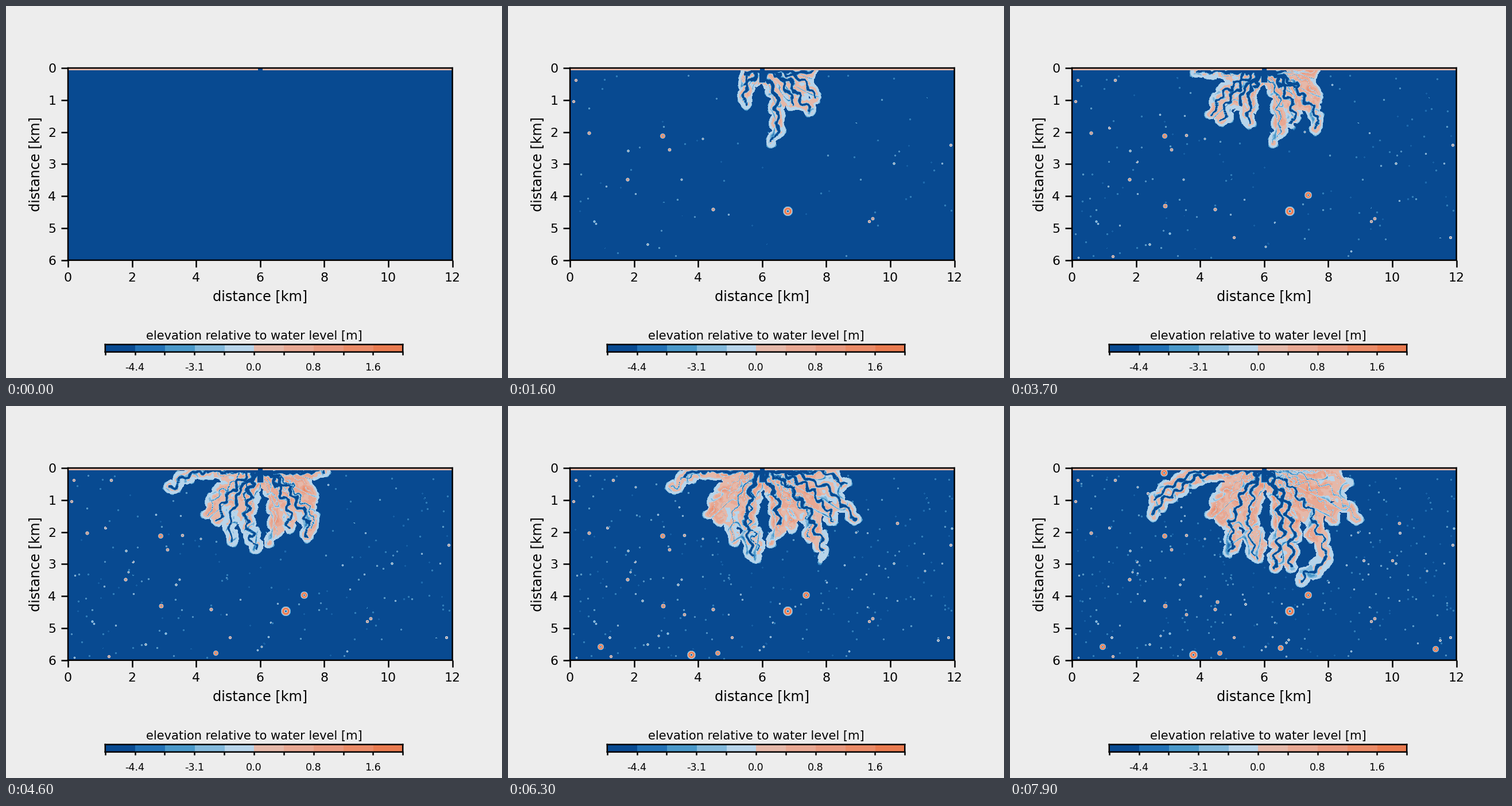
Recreate the animation shown at these times as a matplotlib script. Size 864 px wide and 648 px high, loop 8 s.

```python
import numpy as np
import matplotlib.pyplot as plt
from matplotlib.animation import FuncAnimation
from matplotlib.colors import ListedColormap

FRAMES, STEP = 80, 100
W, H = 670, 335                 # map size in pixels
X0, Y0 = 108, 108               # map corner on the stage
ROWS, COLS = slice(0, 214), slice(116, 522)   # part the delta can reach
MOUTH = np.array([443., 108.])
GROWTH = 1.2                    # seconds a lobe needs to build out

COLORS = ["#084a91", "#2271b5", "#4a98c9", "#83b9dc", "#b7d4ea",
          "#e5b8a9", "#e8a893", "#e8997f", "#ea8b67", "#e97b50"]
CMAP = ListedColormap(COLORS)

# lobe tip and the time it is reached
LOBES = [(408, 133, .8), (530, 116, 1), (412, 168, 1.1), (536, 156, 1.2),
         (497, 170, 1.4), (522, 186, 1.5), (461, 237, 1.6),
         (352, 190, 2.5), (325, 115, 2.7), (418, 203, 2.8), (537, 210, 2.7),
         (370, 200, 3.6), (494, 212, 3.8), (390, 232, 4.2), (285, 144, 4.3),
         (528, 226, 4.4), (555, 116, 4.5), (434, 248, 4.6),
         (588, 137, 5.2), (566, 200, 5.5), (604, 198, 5.6),
         (430, 264, 6.3), (549, 270, 6.4), (252, 163, 6.7), (457, 281, 6.8),
         (386, 257, 7.6), (247, 187, 7.8), (486, 281, 7.8)]

# the largest craters: x, y, radius, time
CRATERS = [(269, 226, 5, .4), (487, 357, 9, .9), (270, 348, 4.5, 2.2),
           (519, 329, 7, 3.4), (365, 430, 5, 4), (161, 419, 6, 5.2),
           (319, 433, 8, 6), (268, 116, 7, 6.5), (741, 423, 6, 7.3),
           (471, 421, 5.5, 7.6)]


def noise(u, v, seed):
    """Smooth value noise in -1..1."""
    grid = np.random.default_rng(seed).uniform(-1, 1, (64, 64))
    iu, iv = np.floor(u).astype(int), np.floor(v).astype(int)
    fu, fv = u - iu, v - iv
    fu, fv = fu * fu * (3 - 2 * fu), fv * fv * (3 - 2 * fv)

    def at(a, b):
        return grid[(iu + a) % 64, (iv + b) % 64]

    return ((at(0, 0) * (1 - fu) + at(1, 0) * fu) * (1 - fv)
            + (at(0, 1) * (1 - fu) + at(1, 1) * fu) * fv)


yy, xx = np.mgrid[0:H, 0:W]
yy, xx = yy + Y0 + .5, xx + X0 + .5
dx, dy = xx[ROWS, COLS], yy[ROWS, COLS]
radius = np.hypot(dx - MOUTH[0], dy - MOUTH[1])
angle = np.arctan2(dy - MOUTH[1], dx - MOUTH[0])

# slightly bent coordinates give ragged banks
wx = dx + 2.5 * noise(dx / 9, dy / 9, 1) + 1.3 * noise(dx / 4, dy / 4, 2)
wy = dy + 2.5 * noise(dx / 9, dy / 9, 3) + 1.3 * noise(dx / 4, dy / 4, 4)

rng = np.random.default_rng(12)
arrival = np.full(dx.shape, np.inf)   # time at which each pixel silts up
channels = []                         # distance, half width, opening, closing


def course(start, tip, bow):
    """Bowed path from start to tip with meanders, never above the shore."""
    chord = tip - start
    length = np.hypot(*chord)
    side = np.array([-chord[1], chord[0]]) / length
    s = np.linspace(0, 1, int(length / 2))
    wave = rng.uniform(3, 5) * np.sin(s * length / rng.uniform(3.3, 4.4) + rng.uniform(0, 6))
    wave += 2 * np.sin(s * length / 9 + rng.uniform(0, 6))
    wave *= np.clip(s * length / 25, 0, 1)
    pts = start + np.outer(s, chord) + np.outer(4 * bow * length * s * (1 - s) + wave, side)
    pts[1:, 1] = np.maximum(pts[1:, 1], 114 + wave[1:] / 2)
    return pts


def add_lobe(start, tip, t1, bow, span=GROWTH):
    pts = course(np.array(start, float), np.array(tip, float), bow)
    best, share = np.full(dx.shape, 1e9), np.zeros(dx.shape)
    for s, (px, py) in zip(np.linspace(0, 1, len(pts)), pts):
        d = (wx - px) ** 2 + (wy - py) ** 2
        hit = d < best
        best[hit], share[hit] = d[hit], s
    d = np.sqrt(best)
    reach = 16 - 5 * share
    when = t1 - span + span * (.85 * share + .15 * d / reach)
    inside = d < reach
    arrival[inside] = np.minimum(arrival, np.maximum(when, 0))[inside]
    channels.append((d, 2.7 - 1.1 * share, t1 - span + span * share, t1 + 1.1))


for x, y, t1 in LOBES:
    add_lobe(MOUTH, (x, y), t1, .13 * np.sign(MOUTH[0] - x))
add_lobe((549, 262), (504, 303), 6.9, -.1, .5)
trunk = np.maximum(np.abs(dx - MOUTH[0]), dy - 128)

# ---- craters: height and time of impact per pixel ----
pit, pit_time = np.zeros((H, W)), np.full((H, W), np.inf)


def crater(x, y, r, top, t):
    n = int(r) + 2
    cy, cx = int(y) - Y0, int(x) - X0
    box = (slice(max(cy - n, 0), cy + n + 1), slice(max(cx - n, 0), cx + n + 1))
    q = np.hypot(xx[box] - x - .5, yy[box] - y - .5) / r
    hit = q < 1.05
    pit[box][hit] = (top * np.exp(-((q - .46) / .27) ** 2))[hit]
    pit_time[box][hit] = t


for t in np.sort(rng.uniform(.02, 7.9, 390)):
    size = rng.random()
    crater(int(rng.uniform(110, 775)), int(rng.uniform(114, 441)),
           2.1 + 2.2 * size ** 8, 1.1 + 3.6 * size + 3.5 * size ** 10, t)
for x, y, r, t in CRATERS:
    crater(x, y, r * 1.15, min(9.9, 5 + .9 * r), t)

# ---- surface texture, drawn out along the flow ----
streak = (noise(radius / 24, angle * 8 + 30, 5)
          + .7 * noise(radius / 11, angle * 17 + 30, 6)
          + .5 * noise(dx / 5, dy / 5, 7))
rills = np.clip(1 - np.abs(noise(radius / 30, angle * 7 + 30, 8)) / .14, 0, 1)
blobs = np.clip(noise(dx / 10, dy / 10, 9) - .5, 0, 1)


def soften(mask):
    """Blur with the top edge mirrored, so only open banks fade."""
    m = np.vstack([mask[::-1], mask]).astype(np.float32)
    for k in (1, 2, 3, 4):
        for axis in (0, 1):
            m = (m + np.roll(m, k, axis) + np.roll(m, -k, axis)) / 3
    return m[len(mask):]


def delta(t):
    mask = arrival < t
    soft = soften(mask)
    age = np.clip((t - arrival) / 4, 0, 1)
    inner = np.clip((soft - .7) / .25, 0, 1)
    z = np.minimum(4.6, 3 + (soft - .45) * 12)
    z += inner * (.1 + .9 * streak + 1.1 * age + 5 * blobs * age - 3 * rills)
    cut = 1 + 2.6 * (trunk - 4.5)
    gap = trunk - 4.5
    for d, width, opened, off in channels:
        if t <= opened.min():
            continue
        fade = np.clip((t - off) / 1.5, 0, 1)
        bank = np.where(t > opened, d - width * (1 - .55 * fade), 99)
        cut = np.minimum(cut, 1 + 2.6 * bank + 4 * fade)
        gap = np.minimum(gap, bank)
    z += .8 * np.clip(1.2 - gap / 5, 0, 1) * (soft > .65)
    return mask, np.minimum(z, cut)


def surface(t):
    z = np.where(pit_time <= t, pit, 0)
    mask, land = delta(t)
    z[ROWS, COLS] = np.where(mask, land, z[ROWS, COLS])
    z[:4] = 5.5
    z[:4, 331:339] = 0
    return np.clip(z, 0, 9.99)


plt.rcParams.update({
    "font.family": "DejaVu Sans", "axes.linewidth": 1,
    "xtick.major.width": 1, "ytick.major.width": 1,
    "xtick.major.size": 4.8, "ytick.major.size": 4.8,
    "axes.labelsize": 9.6, "xtick.labelsize": 8.8, "ytick.labelsize": 8.8,
})
fig = plt.figure(figsize=(4.8, 3.6), dpi=180, facecolor="#ededed")
ax = fig.add_axes([.125, 205.2 / 648, .775, 334.8 / 648])
image = ax.imshow(surface(0), cmap=CMAP, vmin=0, vmax=10, aspect="auto",
                  extent=(0, 12, 6, 0), interpolation="nearest")
ax.set_xticks(range(0, 13, 2))
ax.set_yticks(range(7))
ax.set_xlabel("distance [km]", labelpad=4.3)
ax.set_ylabel("distance [km]")

bar = fig.add_axes([.2, .07, .6, .02])
bar.imshow([np.arange(10) + .5], cmap=CMAP, vmin=0, vmax=10, aspect="auto",
           extent=(0, 10, 0, 1), interpolation="nearest")
bar.set_yticks([])
bar.set_xticks(range(11), ["", "-4.4", "", "-3.1", "", "0.0", "", "0.8", "", "1.6", ""])
bar.tick_params(axis="x", length=2, pad=5.2, labelsize=7)
fig.text(.5, 1 - 580.5 / 648, "elevation relative to water level [m]",
         fontsize=8.4, ha="center", va="baseline")
for spine in [*ax.spines.values(), *bar.spines.values()]:
    spine.set_snap(False)


def update(i):
    image.set_data(surface(i * STEP / 1000))
    return image,


anim = FuncAnimation(fig, update, frames=FRAMES, interval=STEP,
                     repeat=True, repeat_delay=0, blit=False)
plt.show()
```
